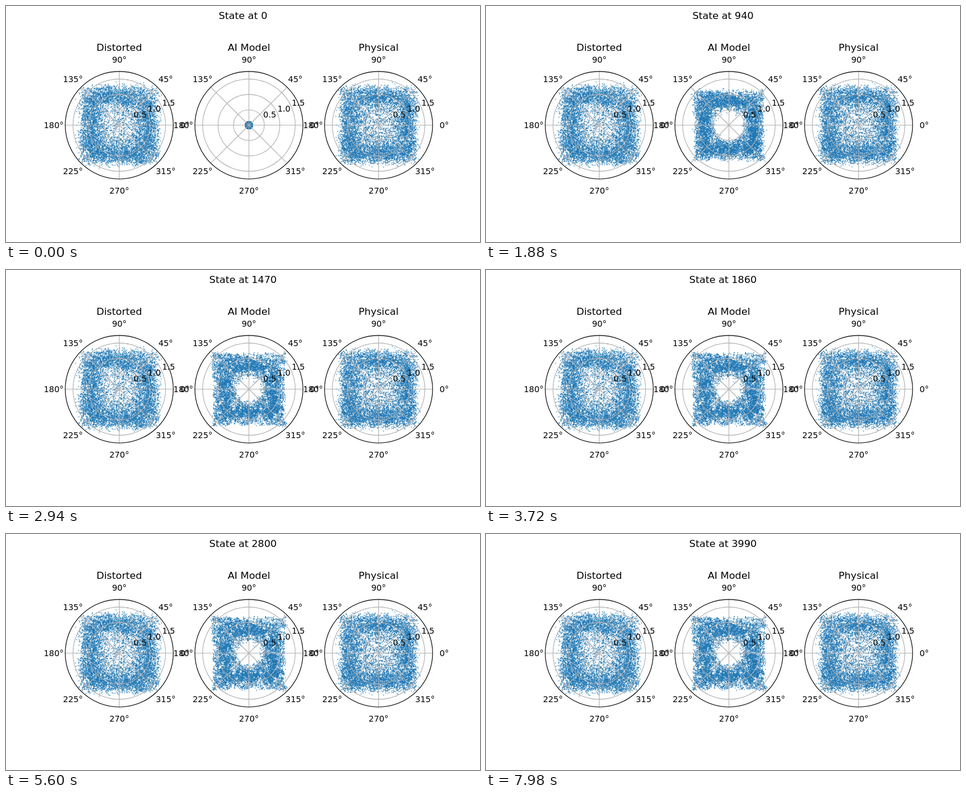
Recreate the animation shown at these times as an HTML page with a canvas. Size 800x400 px, loop 8 s.

```html
<!DOCTYPE html>
<html lang="en">
<head>
<meta charset="utf-8">
<title>Polar states</title>
<style>
  html, body { margin: 0; width: 100%; height: 100%; overflow: hidden; background: #fff; }
  canvas, svg { position: absolute; left: 0; top: 0; width: 800px; height: 400px; }
  text { font: 13.89px "DejaVu Sans", sans-serif; text-anchor: middle; fill: #000; }
  .title { font-size: 16.67px; }
  .radius { text-anchor: start; }
  .grid { fill: none; stroke: #b0b0b0; stroke-width: 1.11; }
  .rim { fill: none; stroke: #000; stroke-width: 1.11; }
</style>
</head>
<body>
<canvas id="still" width="800" height="400"></canvas>
<canvas id="model" width="800" height="400"></canvas>
<svg id="axes" viewBox="0 0 800 400"><text id="state" class="title" x="400" y="22">State at 0</text></svg>
<script>
const LOOP = 8000, STEP = 20;
const CY = 202, RIM = 91.18, UNIT = 52.1, GAP = 218.82;
const COUNT = 8400, CLUMP = 3, DOT = 1.5;
const axes = document.getElementById('axes');
const state = document.getElementById('state');
const centre = i => 400 + 10 + (i - 1) * GAP;

function add(tag, attrs, content = '') {
  const node = document.createElementNS('http://www.w3.org/2000/svg', tag);
  for (const key in attrs) node.setAttribute(key, attrs[key]);
  node.textContent = content;
  axes.append(node);
}

function drawAxes(title, i) {
  const cx = centre(i), rings = [0.5, 1, 1.5];
  const label = (content, x, y, cls = '') => add('text', { x, y: Math.round(y), class: cls }, content);
  for (let deg = 0; deg < 360; deg += 45) {
    const c = Math.cos(deg * Math.PI / 180), s = Math.sin(deg * Math.PI / 180);
    add('line', { class: 'grid', x1: cx, y1: CY, x2: cx + RIM * c, y2: CY - RIM * s });
    label(deg + '°', cx + 110.7 * c, CY - 110.7 * s + 5);
  }
  for (const r of rings) add('circle', { class: 'grid', cx, cy: CY, r: r * UNIT });
  add('circle', { class: 'rim', cx, cy: CY, r: RIM });
  for (const r of rings) {
    const a = Math.PI / 8;
    label(r.toFixed(1), cx + r * UNIT * Math.cos(a), CY - r * UNIT * Math.sin(a) - 3, 'radius');
  }
  label(title, cx, 76, 'title');
}

function seeded(seed) {
  return () => {
    seed = (seed + 0x6D2B79F5) | 0;
    let v = Math.imul(seed ^ (seed >>> 15), 1 | seed);
    v = (v + Math.imul(v ^ (v >>> 7), 61 | v)) ^ v;
    return ((v ^ (v >>> 14)) >>> 0) / 4294967296;
  };
}
const random = seeded(11);
const gauss = () => Math.sqrt(-2 * Math.log(1 - random())) * Math.cos(2 * Math.PI * random());
const lerp = (a, b, k) => a + (b - a) * k;
const sigmoid = v => 1 / (1 + Math.exp(-v));
const squareSize = (x, y, power) => (Math.abs(x) ** power + Math.abs(y) ** power) ** (1 / power);

// A square cloud with a denser square band that fades towards the upper corners,
// and a thinner (or empty) round core.
function sample({ half, spread, band, core, bow }) {
  const points = [];
  while (points.length < COUNT) {
    const x = (random() * 2 - 1) * half, y = (random() * 2 - 1) * half;
    const upperCorner = Math.max(0, -y) * Math.abs(x) / half ** 2;
    const inBand = Math.exp(-(((squareSize(x, y, 8) - band) / 9) ** 2));
    const outside = sigmoid((Math.hypot(x, y) - 24) / spread);
    const density = (0.36 + 0.64 * inBand * (1 - upperCorner)) * lerp(core, 1, outside);
    if (random() > density) continue;
    const bx = x * (1 - bow * (1 - (y / half) ** 2));
    const by = y * (1 - bow * (1 - (x / half) ** 2));
    for (let i = 0; i < CLUMP; i++) {
      const px = bx + gauss() * spread, py = by + gauss() * spread;
      if (Math.hypot(px, py) < RIM - 1) points.push([px, py]);
    }
  }
  return points;
}

function brush(id) {
  const pen = document.getElementById(id).getContext('2d');
  pen.fillStyle = 'rgba(31,119,180,0.8)';
  return pen;
}
const dot = (pen, x, y) => pen.fillRect(x - DOT / 2, y - DOT / 2, DOT, DOT);

const still = brush('still'), pen = brush('model');
const distorted = sample({ half: 63, spread: 4, band: 47, core: 0.5, bow: -0.03 });
const physical = sample({ half: 62, spread: 3.5, band: 46, core: 0.55, bow: -0.03 });
distorted.forEach(([x, y]) => dot(still, centre(0) + x, CY + y));
physical.forEach(([x, y]) => dot(still, centre(2) + x, CY + y));

// Each model point has three poses: a small bud, a smooth ring and the final cloud.
const particles = sample({ half: 63, spread: 1.5, band: 42, core: 0, bow: 0.06 }).map(([x, y]) => {
  const size = squareSize(x, y, 4);
  const pull = lerp(45, size, 0.78) / size;
  const shrink = 6 * Math.sqrt(random()) / Math.hypot(x, y);
  return {
    bud: [x * shrink, y * shrink],
    ring: [x * pull + gauss() * 2.4, y * pull + gauss() * 2.4],
    final: [x, y]
  };
});

function drawModel(t) {
  const grow = 1 - Math.exp(-((t / 350) ** 1.6));
  const sharpen = sigmoid((t - 2400) / 240);
  pen.clearRect(0, 0, 800, 400);
  for (const { bud, ring, final } of particles) {
    const [x, y] = bud.map((b, axis) => lerp(lerp(b, ring[axis], grow), final[axis], sharpen));
    dot(pen, centre(1) + x, CY + y);
  }
}

['Distorted', 'AI Model', 'Physical'].forEach(drawAxes);

const start = performance.now();
let shown = -1;
function tick() {
  const step = Math.floor(((performance.now() - start) % LOOP) / STEP);
  if (step !== shown) {
    shown = step;
    state.textContent = 'State at ' + step * 10;
    drawModel(step * STEP);
  }
  requestAnimationFrame(tick);
}
tick();
</script>
</body>
</html>
```
